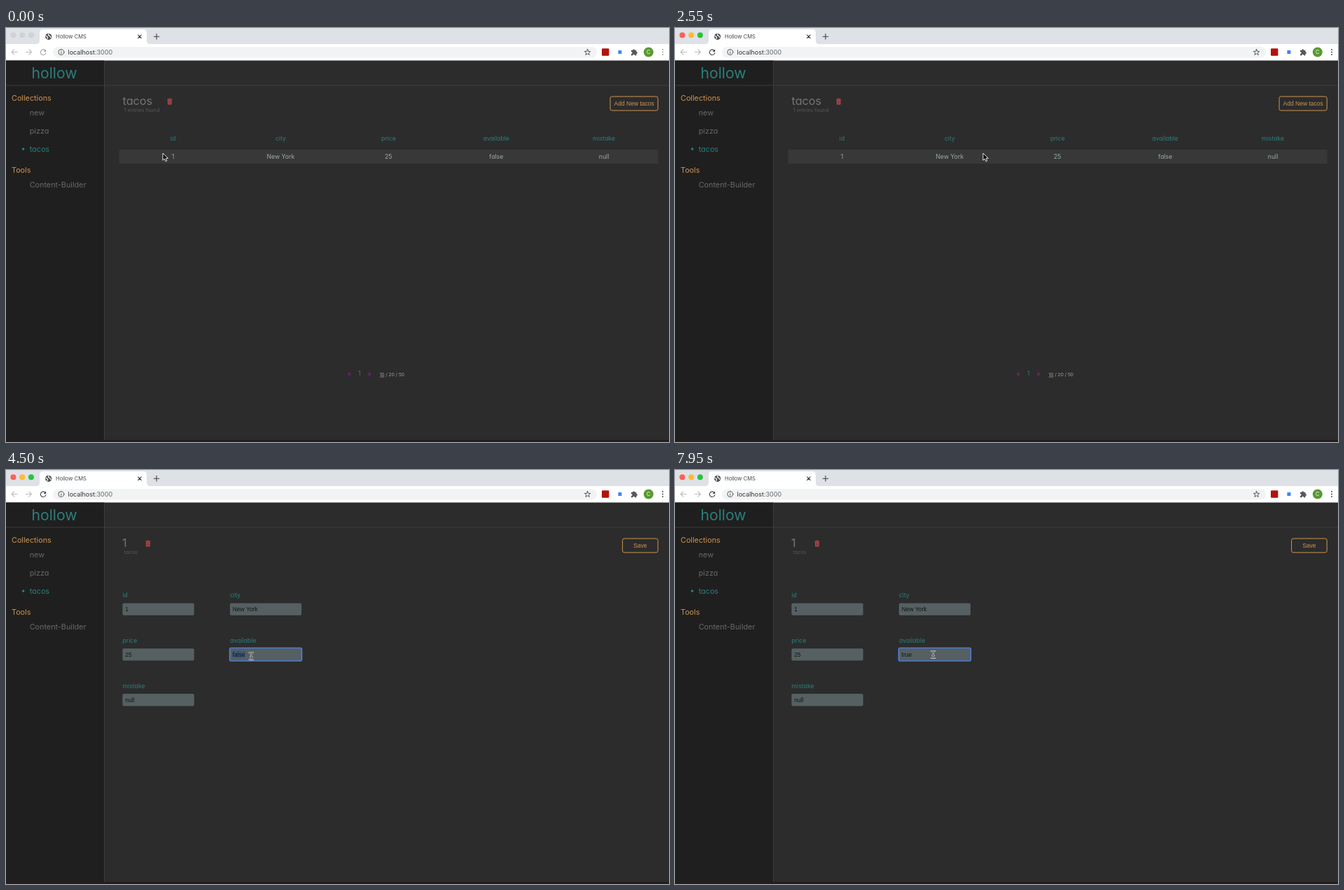
An HTML page for the animation above (8 s loop, 947 px wide and 592 px high).

```html
<!DOCTYPE html>
<html lang="en">
<head>
<meta charset="utf-8">
<title>Hollow CMS</title>
<style>
  html, body { margin: 0; width: 100%; height: 100%; overflow: hidden; background: #2c2c2c; }
  svg { display: block; width: 100%; height: 100%; }
  text { font-family: Inter, sans-serif; }
  .page text { font-feature-settings: "cv11"; }
  .page text.arial { font-family: "Liberation Sans", Arial, sans-serif; font-size: 8.5px; }
  .brand { font-size: 21.2px; fill: #2b7f7d; }
  .nav { font-size: 10.8px; fill: #686868; }
  .title { font-size: 16.2px; fill: #747474; }
  .sub { font-size: 7.3px; fill: #575757; }
  .cell { font-size: 8.7px; fill: #9bacaa; }
  .small { font-size: 6.6px; fill: #a3a3a3; }
  .middle { text-anchor: middle; }
  .page .teal { fill: #2b7f7d; }
  .page .orange { fill: #cd9450; }
  .purple { fill: #8b1f8b; font-size: 10px; }
  .line { fill: none; stroke-linecap: round; stroke-linejoin: round; }
  .button { fill: none; stroke: #cd9450; }
</style>
</head>
<body>
<svg viewBox="0 0 947 592" preserveAspectRatio="none">
  <defs>
    <g id="trash">
      <path d="M-3.6-3.2H3.6M-1.3-3.4V-4.2H1.3V-3.4" fill="none" stroke="#bf4650"/>
      <path d="M-3-2.2H3L2.7 4H-2.7Z" fill="#bf4650"/>
      <path d="M-1.3-1V3M0-1V3M1.3-1V3" stroke="#2c2c2c" stroke-width=".5"/>
    </g>
    <path id="beam" d="M-2.6-5Q0-5 0-3.6Q0-5 2.6-5M-2.6 5Q0 5 0 3.6Q0 5 2.6 5M0-4V4M-1.3 1H1.3"/>
  </defs>

  <g id="browser">
    <rect width="947" height="47" fill="#fff"/>
    <rect width="947" height="23" fill="#dee1e6"/>
    <path d="M43 23Q48 23 48 18V7Q48 2 53 2H196Q201 2 201 7V18Q201 23 206 23Z" fill="#fff"/>
    <g id="lights">
      <circle cx="10.4" cy="10.3" r="4"/><circle cx="23.2" cy="10.3" r="4"/><circle cx="35.9" cy="10.3" r="4"/>
    </g>
    <circle cx="60.7" cy="12.3" r="4.6" fill="#4b4f54"/>
    <path d="M57 11.2L59.6 13 59 15.4M61 8.5L60.4 10.4 62.6 11.2 64 13.6" class="line" stroke="#fff" stroke-width="1.2"/>
    <text x="71" y="15" font-size="7.6" fill="#45494d">Hollow CMS</text>
    <g class="line" stroke="#3c4043" stroke-width="1.1">
      <path d="M188.6 9.9L193.2 14.5M193.2 9.9L188.6 14.5M211.2 12.2H218.8M215 8.4V16"/>
    </g>
    <rect x="67" y="27" width="777" height="15.4" rx="7.7" fill="#f1f3f4"/>
    <g class="line" stroke="#babcbe" stroke-width="1.1">
      <path d="M16.2 34.5H8.2M11.8 30.8L8.1 34.5 11.8 38.2M28.4 34.5H36.4M32.8 30.8L36.5 34.5 32.8 38.2"/>
    </g>
    <g id="reload">
      <path d="M56.2 32.4A3.8 3.8 0 1 0 56.9 35.5" class="line" stroke="currentColor" stroke-width="1.1"/>
      <path d="M57.2 30.4V34H53.6Z" fill="currentColor"/>
    </g>
    <g class="line" stroke="#55595e">
      <circle cx="78.9" cy="34.5" r="4"/>
      <path d="M78.9 34.3V36.5M78.9 32.3V32.4"/>
      <path id="star"/>
    </g>
    <text x="88.5" y="37.7" font-size="9" fill="#303336">localhost<tspan fill="#63676b">:3000</tspan></text>
    <rect x="851" y="29.3" width="10.4" height="10.4" rx="1" fill="#b3130b"/>
    <rect x="874.4" y="32" width="5" height="5" fill="#4285f4"/>
    <path d="M893 31.8H895.2A1.5 1.5 0 1 1 898.2 31.8H900.4V34A1.5 1.5 0 1 1 900.4 37V39.2H898.2A1.5 1.5 0 0 0 895.2 39.2H893V37A1.5 1.5 0 0 0 893 34Z" fill="#55595e"/>
    <circle cx="917.8" cy="34.5" r="7" fill="#5b9a32"/>
    <text x="917.8" y="37.2" font-size="7.4" fill="#fff" class="middle">C</text>
    <g id="menu" fill="currentColor">
      <circle cx="938" cy="31" r="1"/><circle cx="938" cy="34.5" r="1"/><circle cx="938" cy="38" r="1"/>
    </g>
  </g>

  <g class="page">
    <rect y="46.5" width="947" height="545.5" fill="#2c2c2c"/>
    <rect y="46.5" width="140" height="545.5" fill="#1f1f1f"/>
    <path d="M140.5 46.5V589M0 82H947" stroke="#404040" stroke-width=".9"/>
    <rect y="589" width="947" height="3" fill="#231d1f"/>
    <text class="brand" x="36.5" y="72">hollow</text>
    <text class="nav orange" x="8" y="104">Collections</text>
    <text class="nav" x="33.7" y="125.4">new</text>
    <text class="nav" x="33.7" y="151">pizza</text>
    <text class="nav teal" x="33.7" y="176.5">tacos</text>
    <circle cx="24.6" cy="173" r="1.8" class="teal"/>
    <text class="nav orange" x="8" y="207">Tools</text>
    <text class="nav" x="33.7" y="228">Content-Builder</text>

    <g id="list">
      <text class="title" x="166.5" y="109.5">tacos</text>
      <text class="sub" x="168.7" y="119.7">1 entries found</text>
      <use href="#trash" x="233.8" y="105.4"/>
      <rect class="button" x="863" y="98" width="68.2" height="20" rx="2.5"/>
      <text class="arial orange middle" x="897.2" y="111.2">Add New tacos</text>
      <rect x="161.6" y="174" width="770" height="20" fill="#383838"/>
      <g id="table"></g>
      <text class="purple middle" x="490.3" y="498.3">«</text>
      <text class="cell teal middle" x="504.8" y="497.3">1</text>
      <text class="purple middle" x="519.2" y="498.3">»</text>
      <text class="small" x="533.7" y="497.7"><tspan text-decoration="underline">10</tspan> / 20 / 50</text>
    </g>

    <g id="form">
      <text class="title" x="166" y="109.5">1</text>
      <text class="sub" x="168.7" y="119.7">tacos</text>
      <use href="#trash" x="202.9" y="105.4"/>
      <rect class="button" x="880.6" y="98" width="50.6" height="20" rx="2.5"/>
      <text class="arial orange middle" x="905.9" y="111.2">Save</text>
      <g id="fields"></g>
      <rect id="ring" x="319.5" y="254.5" width="103" height="18.4" rx="1.8" fill="none" stroke="#5580d8" stroke-width="1.5"/>
      <rect id="selection" x="323.6" y="258.5" width="18.4" height="10" fill="#43576f"/>
      <text id="value" class="arial" x="323.6" y="266.6" fill="#101414"></text>
      <rect id="caret" y="258.3" width=".8" height="10" fill="#101010"/>
      <g id="suggestion">
        <rect x="320" y="273.7" width="122.4" height="32.8" rx="2" fill="#fff"/>
        <text x="327.7" y="293.2" font-size="8.5" font-weight="500" fill="#222" style="font-feature-settings:normal">true</text>
      </g>
    </g>
  </g>

  <path id="arrow" d="M0 0V10.2L2.4 8 4.1 11.8 5.8 11 4.2 7.3H7.4Z" fill="#000" stroke="#fff" stroke-width=".9"/>
  <g id="ibeam" class="line">
    <use href="#beam" stroke="#e8e8e8" stroke-width="2"/>
    <use href="#beam" stroke="#222" stroke-width=".8"/>
  </g>
</svg>
<script>
const LOOP = 8000, STEP = 150;
const el = id => document.getElementById(id);
const show = (id, on) => el(id).style.display = on ? '' : 'none';

const starPoint = i => {
  const angle = (i / 5 - 0.5) * Math.PI, radius = i % 2 ? 1.9 : 4.5;
  return `${830.6 + radius * Math.cos(angle)} ${34.8 + radius * Math.sin(angle)}`;
};
el('star').setAttribute('d', `M${Array.from({ length: 10 }, (_, i) => starPoint(i)).join('L')}Z`);

const record = { id: '1', city: 'New York', price: '25', available: 'false', mistake: 'null' };
Object.entries(record).forEach(([name, value], i) => {
  const column = 238.5 + 153.9 * i;
  el('table').innerHTML +=
    `<text class="cell teal middle" x="${column}" y="161">${name}</text>
     <text class="cell middle" x="${column}" y="186.6">${value}</text>`;

  const x = 166.5 + 153.4 * (i % 2), y = 190.4 + 64.8 * Math.floor(i / 2);
  el('fields').innerHTML +=
    `<text class="cell teal" x="${x}" y="${y - 8}">${name}</text>
     <rect x="${x}" y="${y}" width="102.2" height="17.4" rx="1.8" fill="#566062"/>
     <text class="arial" x="${x + 3.8}" y="${y + 11.6}" fill="#101414">${name === 'available' ? '' : value}</text>`;
});

// Latest entry whose start time has been reached: [time, ...values]
const at = (track, t) => track.filter(entry => entry[0] <= t).pop();

const pointer = [
  [0, 440, 179, 'arrow'], [3300, 432, 198, 'arrow'], [3450, 408, 236, 'arrow'],
  [3600, 383.3, 268.3, 'ibeam'], [3750, 368, 275, 'arrow'], [3900, 357, 275, 'arrow'],
  [4050, 351, 269, 'ibeam'], [4200, 350.2, 266.3, 'ibeam'], [7950, 368.8, 264, 'ibeam']
];
const typing = [[0, 'false'], [6000, 't'], [6150, 'tr'], [6300, 'tru'], [7200, 'true']];
const caret = [[0, false], [4350, true], [4500, false], [6000, true], [6750, false], [7200, true], [7650, false]];

function render(time) {
  const t = Math.floor(time / STEP) * STEP;
  const active = t >= 1950, editing = t >= 2700;

  ['#ff5f57', '#febc2e', '#28c33f'].forEach((color, i) =>
    el('lights').children[i].setAttribute('fill', active ? color : '#d0d2d6'));
  el('reload').style.color = active ? '#3c4043' : '#a2a5a8';
  el('menu').style.color = active ? '#4a4e52' : '#a2a5a8';

  show('list', !editing);
  show('form', editing);
  show('ring', t >= 4350);
  show('selection', t >= 4500 && t < 6000);
  show('suggestion', t >= 6000 && t < 7200);
  show('caret', at(caret, t)[1]);
  el('value').textContent = at(typing, t)[1];
  el('value').setAttribute('fill', t >= 4500 && t < 6000 ? '#0d1838' : '#101414');
  if (editing) el('caret').setAttribute('x', 323.6 + el('value').getComputedTextLength());

  let [, x, y, shape] = at(pointer, t);
  if (t < 900) {
    const p = t / 900;
    x = 224 + 216 * p * p * (3 - 2 * p);
  }
  for (const id of ['arrow', 'ibeam']) {
    show(id, id === shape);
    el(id).setAttribute('transform', `translate(${x} ${y})`);
  }
}

const start = performance.now();
function tick() {
  render((performance.now() - start) % LOOP);
  requestAnimationFrame(tick);
}
tick();
</script>
</body>
</html>
```
